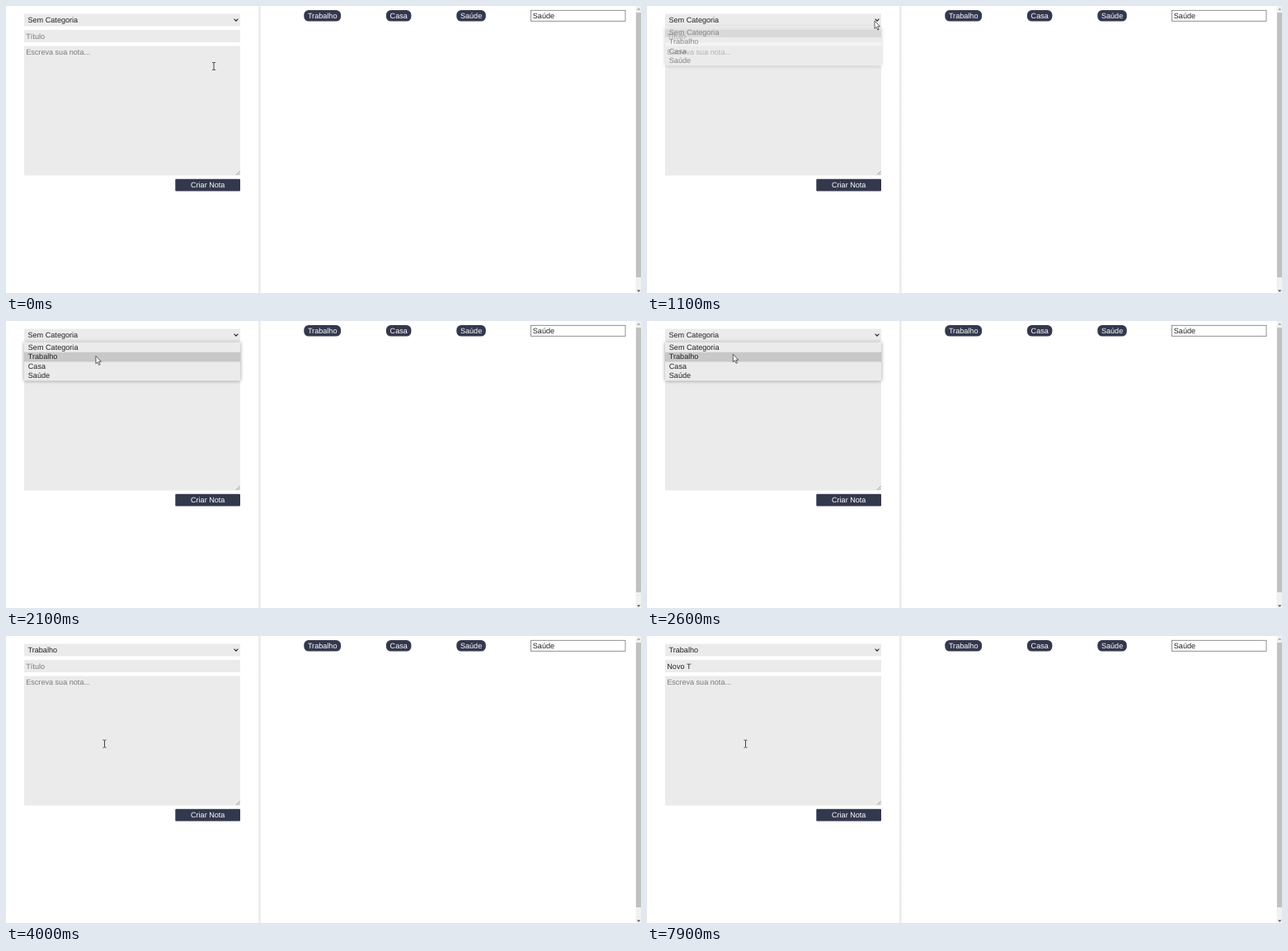
Recreate the animation shown at these times as an HTML page. Size 770 by 348 pixels, loop 8 s.

```html
<!DOCTYPE html>
<html lang="pt">
<head>
<meta charset="utf-8">
<style>
  html, body { margin: 0; width: 100%; height: 100%; overflow: hidden; background: #fff; }
  svg { display: block; }
  text { font: 9.1px "Liberation Sans", Arial, sans-serif; fill: #222; white-space: pre; text-rendering: geometricPrecision; }
  .field { fill: #ebebeb; }
  .hint { fill: #7b7b7b; }
  .dark { fill: #34384d; }
  .light { fill: #fff; text-anchor: middle; }
  #panel { filter: drop-shadow(0 0.6px 2px #0006); }
</style>
</head>
<body>
<svg width="770" height="348" viewBox="0 0 770 348">
  <defs>
    <linearGradient id="edge">
      <stop offset="0" stop-color="#e2e2e2"/>
      <stop offset="1" stop-color="#fff"/>
    </linearGradient>
  </defs>
  <rect x="306.3" width="3.7" height="348" fill="url(#edge)"/>

  <rect class="field" x="22" y="9.5" width="262" height="15"/>
  <text id="choice" x="26.5" y="20.1"></text>
  <path d="M276.6 15.6l2.4 2.5 2.4-2.5" fill="none" stroke="#222" stroke-width="1.1"/>

  <rect class="field" x="22" y="29" width="262" height="15"/>
  <text id="title" x="24.3" y="39.5"></text>
  <rect id="caret" y="32" width="0.9" height="9.6" fill="#111"/>

  <rect class="field" x="22" y="48.5" width="262" height="157"/>
  <text class="hint" x="24.2" y="58.8">Escreva sua nota...</text>
  <path d="M279 204.8l4.6-4.6M281.6 204.8l2-2" stroke="#777" stroke-width="0.7"/>

  <rect class="dark" x="205.3" y="209.8" width="78.7" height="14.6" rx="1"/>
  <text class="light" x="244.7" y="220">Criar Nota</text>

  <g id="pills"></g>
  <rect x="636.6" y="5.3" width="114.4" height="13" fill="#fff" stroke="#767676" stroke-width="0.8"/>
  <text x="638.8" y="14.8">Saúde</text>

  <rect x="763.5" width="6.5" height="348" fill="#f1f1f1"/>
  <rect x="764" y="8" width="6" height="321" fill="#c1c1c1"/>
  <path d="M765 4.8l2.2-2.4 2.2 2.4z" fill="#a0a0a0"/>
  <path d="M765 344.4l2.2 2.4 2.2-2.4z" fill="#505050"/>

  <g id="popup">
    <rect id="panel" x="22" y="26" width="262.2" height="46.5" fill="#ebebeb"/>
    <rect id="hover" x="22" width="262.2" height="11.6" fill="#c8c8c8"/>
  </g>

  <path id="arrow" d="M0 0V9.4L2.1 7.4 3.7 11 5.2 10.3 3.6 6.8H6.5Z" fill="#fff" stroke="#222" stroke-width="0.7"/>
  <path id="beam" d="M-2-4.5H-.6L0-4 .6-4.5H2M0-4V4M-2 4.5H-.6L0 4 .6 4.5H2" fill="none" stroke="#333" stroke-width="0.9"/>
</svg>
<script>
const $ = id => document.getElementById(id);
const clamp = (v, low, high) => Math.max(low, Math.min(high, v));
const show = (id, opacity) => $(id).setAttribute('opacity', +opacity);
const add = (parent, tag, attrs, text = '') => {
  const node = document.createElementNS('http://www.w3.org/2000/svg', tag);
  for (const key in attrs) node.setAttribute(key, attrs[key]);
  node.textContent = text;
  parent.append(node);
  return node;
};

const options = ['Sem Categoria', 'Trabalho', 'Casa', 'Saúde'];
const rowTop = 26.3, rowHeight = 11.55;
options.forEach((name, i) => add($('popup'), 'text', { x: 26.8, y: rowTop + 8.4 + i * rowHeight }, name));

// Each pill fits its label; the gaps between pills are equal
let left = 361.3;
for (const name of options.slice(1)) {
  const pill = add($('pills'), 'rect', { class: 'dark', x: left, y: 5, height: 13.6, rx: 5.6 });
  const label = add($('pills'), 'text', { class: 'light', y: 14.8 }, name);
  const width = label.getComputedTextLength() + 9.2;
  pill.setAttribute('width', width);
  label.setAttribute('x', left + width / 2);
  left += width + 54.9;
}

// Eased pointer moves, each from where the last one ended; sag bends the path down
const moves = [
  { from: 100, to: 1000, x: 276, y: 18 },
  { from: 1400, to: 2300, x: 104.3, y: 40.3, sag: 32 },
  { from: 3000, to: 3400, x: 93, y: 40 },
  { from: 3600, to: 3800, x: 119.5, y: 130.7 }
];
function pointer(t) {
  let x = 252, y = 73;
  for (const m of moves) {
    const k = 1 - (1 - clamp((t - m.from) / (m.to - m.from), 0, 1)) ** 2.4;
    x += (m.x - x) * k;
    y += (m.y - y) * k + (m.sag || 0) * Math.sin(Math.PI * k);
  }
  return [x, y];
}

const phrase = 'Novo T';
const keys = [5400, 5600, 5700, 5900, 6800, 7400];
const opened = 1100, closed = 2800, focused = 3500;

function draw(now) {
  const t = Math.floor(now % 8000 / 100) * 100;
  const [x, y] = pointer(t);

  show('popup', t < closed ? clamp((t - opened + 100) / 200, 0, 1) : 0);
  const row = clamp(Math.floor((y - rowTop) / rowHeight), 0, 3);
  $('hover').setAttribute('y', rowTop + row * rowHeight);
  $('choice').textContent = options[t < closed ? 0 : 1];

  const overText = (y > 29 && y < 44) || y > 48.5;
  const beam = overText && (t < opened || t > closed + 200);
  show('beam', beam);
  show('arrow', !beam);
  $(beam ? 'beam' : 'arrow').setAttribute('transform', `translate(${x} ${y})`);

  const count = keys.filter(k => k <= t).length;
  const title = $('title');
  title.textContent = count ? phrase.slice(0, count) : 'Título';
  title.setAttribute('class', count ? '' : 'hint');
  const lastReset = count ? keys[count - 1] : focused;
  const blink = Math.floor((t - lastReset) / 500) % 2;
  show('caret', t >= focused && !blink);
  $('caret').setAttribute('x', 24.2 + (count ? title.getComputedTextLength() : 0));
}

const start = performance.now();
(function tick() {
  draw(performance.now() - start);
  requestAnimationFrame(tick);
})();
</script>
</body>
</html>
```
